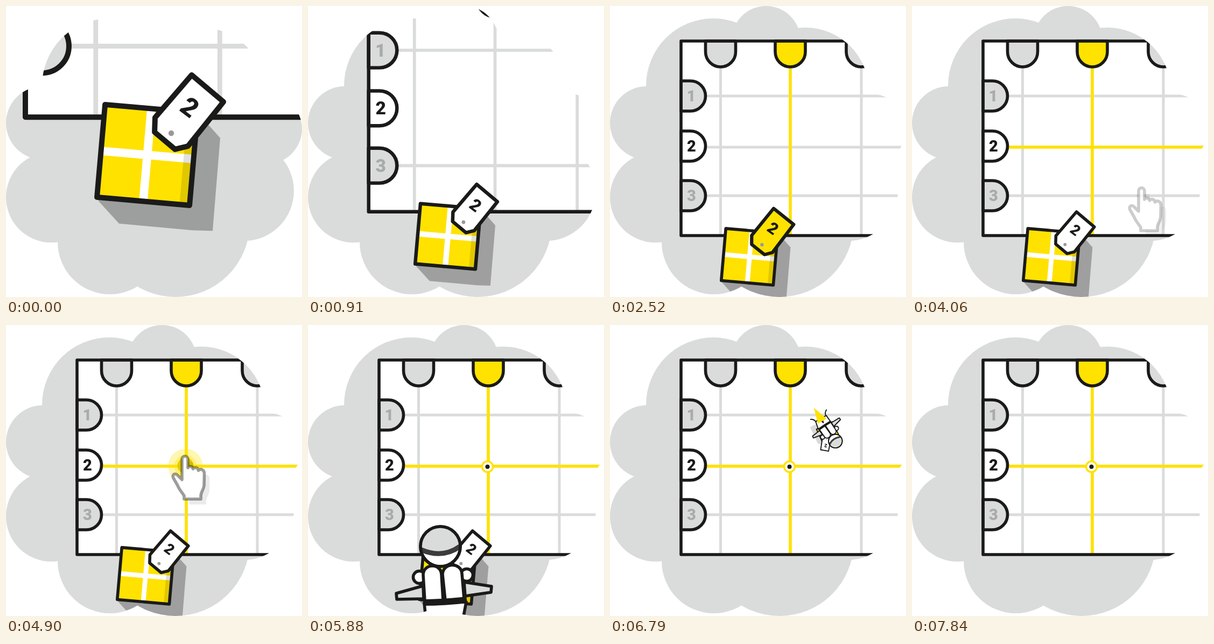
Write an HTML page that moves like this. It is 550 by 540 pixels and loops after 8.33 s.

```html
<!DOCTYPE html>
<html lang="en">
<head>
<meta charset="utf-8">
<title>Parcel delivery</title>
<style>
  html, body { margin: 0; width: 100%; height: 100%; overflow: hidden; background: #fff; }
  svg { display: block; width: 100%; height: 100%; }
  text { font: 900 29px Roboto, Arial, sans-serif; text-anchor: middle; fill: #1a1a18; }
  .ink { stroke: #1a1a18; stroke-width: 5.6; stroke-linejoin: round; stroke-linecap: round; }
  .gray { fill: #dadcdb; }
  .white { fill: #fff; }
  .yellow { fill: #ffe200; }
  .none { fill: none; }
  .grid { stroke: #dadcdb; stroke-width: 5; }
  .lit { stroke: #ffe200; stroke-width: 5.6; }
  .muted { fill: #a9abaa; }
  .band { stroke-width: 12; stroke-linecap: butt; }
  .visor { stroke: #3c3c3a; stroke-width: 9; stroke-linecap: butt; }
</style>
</head>
<body>
<svg viewBox="0 0 550 540">
  <defs>
    <mask id="cloud" maskUnits="userSpaceOnUse" x="0" y="0" width="550" height="540">
      <g fill="#fff">
        <circle cx="192" cy="148" r="125"/>
        <circle cx="290" cy="64" r="64"/>
        <circle cx="363" cy="158" r="118"/>
        <circle cx="485" cy="228" r="65"/>
        <circle cx="442" cy="343" r="93"/>
        <circle cx="315" cy="402" r="138"/>
        <circle cx="193" cy="438" r="97"/>
        <circle cx="84" cy="355" r="84"/>
        <circle cx="68" cy="217" r="68"/>
        <path d="M192 148L290 64 363 158 485 228 442 343 315 402 193 438 84 355 68 217z"/>
      </g>
    </mask>
    <path id="sideTab" d="M132 -28H149.5a28 28 0 0 1 0 56H132z"/>
    <path id="topTab" d="M-28 65V85a28 28 0 0 0 56 0V65z"/>
    <path id="handShape" d="M327 287V249a5.5 5.5 0 0 1 11 0V265C340 261 347 262 347.5 267C350 263 357 264 357.5 270C361 266 368 268 368.5 275L368 298C367 306 362 310 362 317V323H331V317C327 310 322 306 319 298L311 284C308 277 315 274 319 279z"/>
    <path id="route" d="M252 470C250 390 240 146 340 146C372 146 396 180 407 199C432 242 380 266 337 266"/>
  </defs>

  <g mask="url(#cloud)">
    <rect class="gray" width="550" height="540"/>
    <g id="camera">
      <rect class="white" x="132" y="65" width="600" height="361"/>
      <path class="grid" d="M205.5 65V426M335 65V426M467 65V426M132 167H700M132 352H700"/>
      <path id="middleRow" class="grid" d="M132 262H700"/>
      <path id="column" class="lit"/>
      <path id="row" class="lit"/>
      <g class="ink">
        <use href="#topTab" x="205.5" class="gray"/>
        <use href="#topTab" x="335" id="columnTab"/>
        <use href="#topTab" x="467" class="gray"/>
        <use href="#sideTab" y="167" class="gray"/>
        <use href="#sideTab" y="260" id="rowTab"/>
        <use href="#sideTab" y="352" class="gray"/>
        <path class="none" d="M700 65H132V426H700"/>
      </g>
      <text class="muted" x="151" y="177">1</text>
      <text x="151.5" y="269.5">2</text>
      <text class="muted" x="151.5" y="362">3</text>

      <g id="target">
        <circle cx="333.5" cy="263" r="10" class="white" stroke="#ffe200" stroke-width="3.4"/>
        <circle cx="333.5" cy="263" r="4" fill="#1a1a18"/>
      </g>
      <g id="ripple" class="yellow">
        <circle id="rippleOuter" cx="333.5" cy="262"/>
        <circle id="rippleInner" cx="333.5" cy="262"/>
      </g>
      <circle id="press" cx="333.5" cy="261" fill="#dfc600"/>

      <g id="hand">
        <use href="#handShape" x="10" y="10" opacity=".08"/>
        <use id="handFront" href="#handShape" class="white ink"/>
      </g>

      <g id="flight">
        <path id="shadow" d="M208 513L229.8 537 306.7 544 327.5 544.5 335.4 447.8 316 426z"/>
        <g transform="translate(259.3 465.4) rotate(5)">
          <rect class="yellow" x="-48.5" y="-48.5" width="97" height="97"/>
          <path d="M0 -48V48M-48 0H48" stroke="#fff" stroke-width="8.8"/>
          <rect x="38" y="-48" width="9" height="96" opacity=".12"/>
          <rect class="none ink" x="-48.5" y="-48.5" width="97" height="97"/>
        </g>
        <g id="tag">
          <path id="label" class="ink" d="M305.6 382L338.8 410 301.7 456.2 288.2 459.5 266.9 441.6 267.4 426.4z"/>
          <circle cx="284.3" cy="442.7" r="2.9" fill="#999"/>
          <text transform="translate(303.7 415.5) rotate(37)" y="9.5" style="font-size:27px">2</text>
        </g>
        <g id="pilot" class="ink">
          <path class="white" d="M216 516L220 556H246L253 530 262 556H286L294 514z"/>
          <path class="yellow" stroke="none" d="M227 540H281L257 626z"/>
          <path class="none" d="M222 556Q222 572 204 582M286 556Q288 572 304 580"/>
          <circle class="white" cx="207" cy="468" r="11.5"/>
          <circle class="white" cx="295" cy="464" r="11.5"/>
          <path class="gray" d="M214 484L164 498 165 509 215 508zM290 477L341 485 340 496 292 503z"/>
          <path class="white" d="M217 512L214 464C214 442 247 441 248 463L251 511z"/>
          <path class="white" d="M255 511L250 463C250 441 284 439 286 461L290 508z"/>
          <path class="none band" d="M214 515Q254 515 295 510"/>
          <circle class="white" cx="246" cy="411" r="37"/>
          <path class="gray" stroke="none" d="M209 414A37 37 0 1 1 283 408Q250 434 209 414z"/>
          <path class="none visor" d="M210 417Q250 434 282 411"/>
          <circle class="none" cx="246" cy="411" r="37"/>
        </g>
      </g>
    </g>
  </g>
</svg>
<script>
  const LOOP = 8330, STEP = 70;
  const el = id => document.getElementById(id);
  const set = (id, attrs) => {
    for (const name in attrs) el(id).setAttribute(name, attrs[name]);
  };
  const show = (id, on) => set(id, { visibility: on ? 'visible' : 'hidden' });
  const ramp = (t, from, to) => Math.min(1, Math.max(0, (t - from) / (to - from)));
  const lerp = (a, b, k) => a + (b - a) * k;
  const easeOut = (k, power) => 1 - (1 - k) ** power;
  const tinted = k => `rgb(255,${lerp(255, 226, k)},${lerp(255, 0, k)})`;

  function drawCamera(t) {
    const rest = 1 - ramp(t, 700, 980) ** .78;
    set('camera', { transform: `translate(${-199 * rest} ${-552 * rest}) scale(${1 + .78 * rest})` });
    show('middleRow', t >= 980);
  }

  function drawSelection(t) {
    set('columnTab', { fill: t >= 1610 ? '#ffe200' : '#dadcdb' });
    show('column', t >= 1820);
    show('row', t >= 2940);
    set('column', { d: `M335 115V${lerp(115, 424, ramp(t, 1750, 2030))}` });
    set('row', { d: `M180 262H${lerp(180, 550, ramp(t, 2870, 3080))}` });

    const fade = 1 - ramp(t, 2520, 2800);
    set('rowTab', { fill: tinted(Math.min(ramp(t, 2520, 2590), fade)) });
    set('label', { fill: tinted(Math.min(ramp(t, 2240, 2310), fade)) });
    const pulse = Math.min(ramp(t, 2240, 2380), 1 - ramp(t, 2450, 2590));
    set('tag', {
      transform: `translate(303 445) rotate(${-3 * pulse}) scale(${1 + .2 * pulse}) translate(-303 -445)`
    });
  }

  function drawHand(t) {
    const arrive = ramp(t, 4060, 4270), leave = ramp(t, 4620, 5110);
    const ink = lerp(.3, 1, arrive) * (1 - leave), offset = 94 * (1 - arrive) ** 1.4;
    show('hand', t >= 4060 && leave < 1);
    set('hand', { transform: `translate(${offset} ${offset})`, opacity: Math.min(1, ink * 2.4) });
    set('handFront', { 'stroke-opacity': ink });
    show('target', t >= 4970);
  }

  function drawRipple(t) {
    const landing = t >= 7420;
    const k = landing ? ramp(t, 7350, 7840) : ramp(t, 4550, 5180);
    const on = k < 1 && (landing || t >= 4620);
    const r = (landing ? 53 : 40) * easeOut(k, 2);
    show('ripple', on);
    show('press', on && !landing);
    set('rippleOuter', { r, opacity: .7 * (1 - k) });
    set('rippleInner', { r: r * .65, opacity: .8 * (1 - k) });
    set('press', { r: Math.min(15, 30 * k), opacity: Math.min(1, 2 * (1 - k)) });
  }

  function drawFlight(t) {
    const k = ramp(t, 5880, 7140), route = el('route');
    const length = route.getTotalLength(), travelled = length * easeOut(k, 1.215);
    const { x, y } = route.getPointAtLength(travelled);
    const from = route.getPointAtLength(Math.max(0, travelled - 2));
    const to = route.getPointAtLength(Math.min(length, travelled + 2));
    const heading = k ? Math.atan2(to.x - from.x, from.y - to.y) * 180 / Math.PI : 0;
    const size = lerp(1, .13, easeOut(k, 1.1));
    show('flight', t < 7210);
    set('flight', { transform: `translate(${x} ${y}) rotate(${heading}) scale(${size}) translate(-252 -470)` });
    set('shadow', { opacity: lerp(.28, .145, ramp(t, 5880, 6300)) });

    const below = 1 - ramp(t, 5460, 5880);
    set('pilot', {
      transform: `translate(0 ${175 * below ** 1.6})`,
      display: t >= 5530 ? 'inline' : 'none'
    });
  }

  const begin = performance.now();
  function tick() {
    const now = (performance.now() - begin) % LOOP;
    const t = Math.floor(now / STEP) * STEP;
    for (const part of [drawCamera, drawSelection, drawHand, drawRipple, drawFlight]) part(t);
    requestAnimationFrame(tick);
  }
  tick();
</script>
</body>
</html>
```
